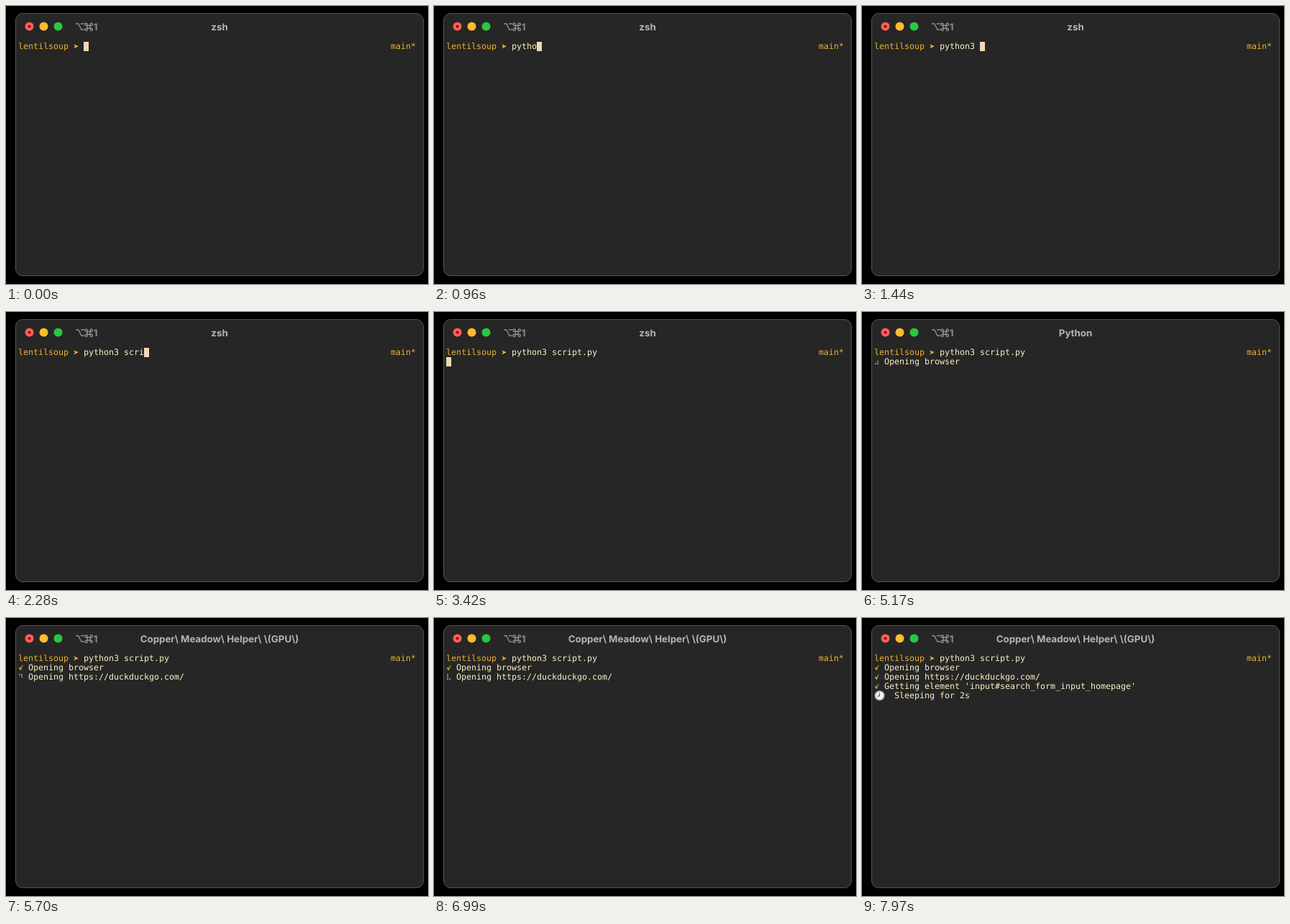
These frames come from a looping animation (587x388 px, 8 s). An HTML page:

```html
<!DOCTYPE html>
<html lang="en">
<head>
<meta charset="utf-8">
<title>Terminal</title>
<style>
  html, body { margin: 0; width: 100%; height: 100%; overflow: hidden; background: #000; }
  svg { display: block; width: 587px; height: 388px; }
  text { white-space: pre; text-rendering: geometricPrecision; }
  .mono { font: 11.63px "DejaVu Sans Mono", monospace; fill: #fbf0c4; }
  .gold { fill: #efb02f; }
  .bar { font: 700 13.3px Inter, sans-serif; fill: #b4b4b4; }
  .key { fill: #8c8c8c; }
  .glyph { fill: none; stroke: #8c8c8c; stroke-width: 1.5; }
  .dots { fill: #d8cfb0; }
  .tick { fill: #b4be2a; }
  .hand { stroke: #3c3c3e; stroke-linecap: round; }
</style>
</head>
<body>
<svg id="stage" viewBox="0 0 587 388">
  <rect x="13.5" y="10.5" width="567" height="366" rx="9.5" fill="#262626" stroke="#565656"/>
  <circle cx="32.5" cy="28.5" r="6" fill="#ff5f57"/>
  <circle cx="32.5" cy="28.5" r="2" fill="#8c0a08"/>
  <circle cx="52.5" cy="28.5" r="6" fill="#febc2e"/>
  <circle cx="72.5" cy="28.5" r="6" fill="#28c840"/>
  <path class="glyph" d="M97 24.7h3.6l4.4 8.4h3.8M104 24.7h4.8"/>
  <path class="glyph" stroke-width="1.3" d="M113.2 27.2h4v4h-4zM113.2 27.2h-1.6a1.6 1.6 0 1 1 1.6-1.6zM117.2 27.2v-1.6a1.6 1.6 0 1 1 1.6 1.6zM117.2 31.2h1.6a1.6 1.6 0 1 1-1.6 1.6zM113.2 31.2v1.6a1.6 1.6 0 1 1-1.6-1.6z"/>
  <text class="bar key" x="121.8" y="33.5">1</text>
  <text class="bar" id="title" x="297" y="33.5" text-anchor="middle"></text>
  <path class="gold" d="M94.2 53.2L100.8 56.3L94.2 59.4L96 56.3z"/>
</svg>
<script>
const LOOP = 8000, CELL = 7, LEFT = 17, TOP = 50, ROW = 13;
const COMMAND = 'python3 script.py';
// time at which each character of the command appears
const KEYS = [480, 660, 840, 900, 960, 1020, 1200, 1440,
  1980, 2080, 2180, 2280, 2460, 2520, 2700, 2880, 3000];
const ENTER = 3420, OPEN = 4020, VISIT = 5700, FOUND = 7280;
const TITLES = [[0, 'zsh'], [3780, 'Python'], [5200, 'Copper\\ Meadow\\ Helper\\ \\(GPU\\)']];
const SPINNER = '⠋⠙⠹⠸⠼⠴⠦⠧⠇⠏';
const SPIN_MS = 80.5, CLOCK_MS = 96.6;

const stage = document.getElementById('stage');
const title = document.getElementById('title');
const colX = col => LEFT + col * CELL;
const rowY = row => TOP + row * ROW;
const show = (node, on) => node.setAttribute('visibility', on ? 'visible' : 'hidden');

function add(tag, attrs, parent = stage) {
  const node = document.createElementNS('http://www.w3.org/2000/svg', tag);
  for (const key in attrs) node.setAttribute(key, attrs[key]);
  return parent.appendChild(node);
}

function write(col, row, text, cls = '') {
  const node = add('text', { class: 'mono ' + cls, x: colX(col), y: rowY(row) + 10 });
  node.textContent = text;
  return node;
}

function makeTask(row, text, start, end) {
  const label = write(2, row, text);
  const dots = Array.from({ length: 6 }, (_, i) => add('circle', {
    class: 'dots', r: 0.85,
    cx: LEFT + (i < 3 ? 2 : 5), cy: rowY(row) + 3.2 + (i % 3) * 3
  }));
  const tick = add('path', {
    class: 'tick', transform: `translate(${LEFT} ${rowY(row)})`,
    d: 'M.5 6.8L1.7 5.8L3 7.4Q4.2 4.3 6.6 2.4L6.8 2.8Q4.8 5.8 3.8 9.7L2.5 9.8Q1.7 7.9.5 6.8z'
  });
  return t => {
    show(label, t >= start);
    show(tick, t >= end);
    const step = 1 + Math.floor((t - start) / SPIN_MS);
    const spinning = t >= start && t < end;
    // braille code points store one dot per bit
    const bits = spinning ? SPINNER.charCodeAt(step % SPINNER.length) - 0x2800 : 0;
    dots.forEach((dot, i) => show(dot, bits >> i & 1));
  };
}

function makeClock(row, start) {
  const group = add('g', { transform: `translate(24.5 ${rowY(row) + 6.2})` });
  add('circle', { r: 6.4, fill: '#f1f1f2', stroke: '#a9a9ad', 'stroke-width': 1.2 }, group);
  for (let a = 0; a < 360; a += 30)
    add('path', { d: 'M0-5.2V-4.6', stroke: '#b8b8bc', 'stroke-width': 0.6, transform: `rotate(${a})` }, group);
  add('path', { class: 'hand', d: 'M0 0V-3.5', 'stroke-width': 0.8 }, group);
  const hour = add('path', { class: 'hand', d: 'M0 0V-2.5', 'stroke-width': 1 }, group);
  const label = write(4, row, 'Sleeping for 2s');
  return t => {
    show(group, t >= start);
    show(label, t >= start);
    hour.setAttribute('transform', `rotate(${30 * (1 + Math.max(0, Math.floor((t - start - 10) / CLOCK_MS)))})`);
  };
}

write(0, 0, 'lentilsoup', 'gold');
write(74, 0, 'main*', 'gold');
const command = write(13, 0, '');
const cursor = add('rect', { width: CELL, height: ROW, fill: '#efdab2' });
const parts = [
  makeTask(1, 'Opening browser', OPEN, VISIT),
  makeTask(2, 'Opening https://duckduckgo.com/', VISIT, FOUND),
  makeTask(3, "Getting element 'input#search_form_input_homepage'", FOUND, FOUND),
  makeClock(4, FOUND)
];

function draw(t) {
  const typed = KEYS.filter(k => k <= t).length;
  const entered = t >= ENTER;
  command.textContent = COMMAND.slice(0, typed);
  cursor.setAttribute('x', entered ? LEFT : colX(13 + typed));
  cursor.setAttribute('y', rowY(entered ? 1 : 0));
  show(cursor, t < OPEN);
  title.textContent = TITLES.filter(([at]) => at <= t).pop()[1];
  parts.forEach(update => update(t));
}

const begin = performance.now();
function tick() {
  draw((performance.now() - begin) % LOOP);
  requestAnimationFrame(tick);
}
tick();
</script>
</body>
</html>
```
